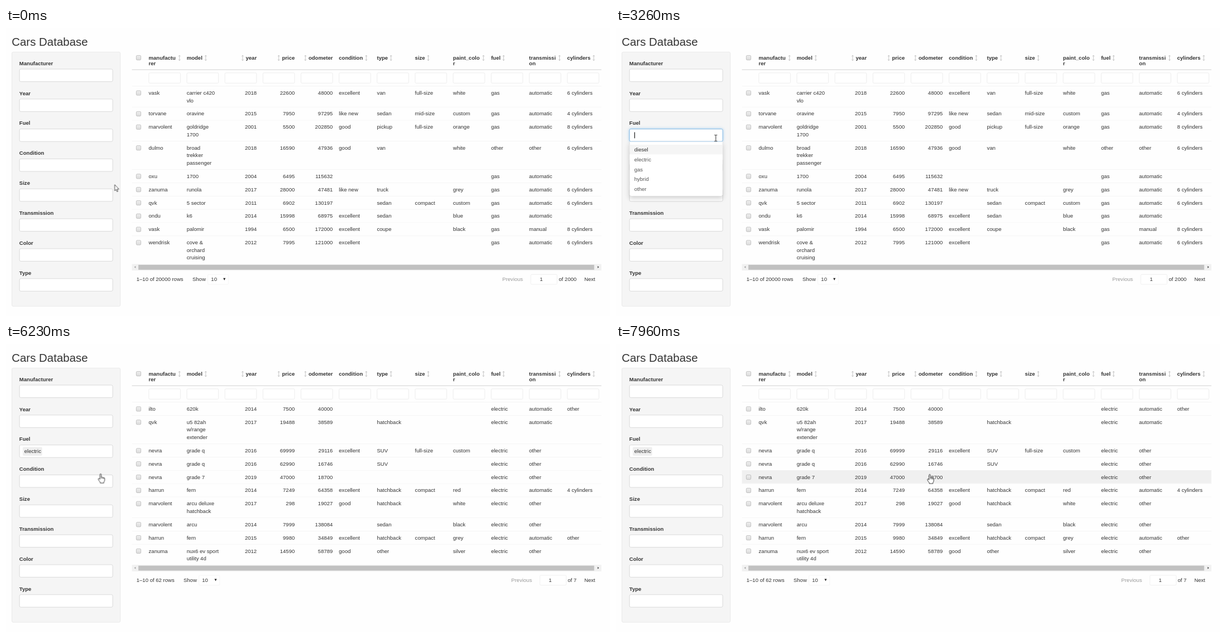
Recreate the animation shown at these times as an HTML page. Size 1082 by 518 pixels, loop 8 s.

```html
<!DOCTYPE html>
<html lang="en">
<head>
<meta charset="utf-8">
<title>Cars Database</title>
<style>
html, body { margin: 0; width: 100%; height: 100%; overflow: hidden; background: #fefefe; }
body { position: relative; }
/* The page is laid out at full size and shown smaller. */
.page { left: 0; top: 0; width: 1588px; height: 760px; transform: scale(.6815); transform-origin: 0 0; font: 14px/20px "Liberation Sans", Arial, sans-serif; color: #333; }
div, svg { position: absolute; box-sizing: border-box; white-space: pre; }
svg { overflow: visible; }
.title { left: 15px; top: 20px; font-size: 30px; line-height: 33px; }
.well { left: 15px; top: 63px; width: 286px; height: 672px; background: #f5f5f5; border: 1px solid #e3e3e3; border-radius: 4px; }
.label { left: 35px; font-weight: bold; }
.input { left: 35px; width: 246px; height: 34px; background: #fff; border: 1px solid #ccc; border-radius: 4px; }
.th { top: 70px; width: 84px; font-weight: bold; line-height: 16px; }
.num { text-align: right; }
.filter { top: 118px; width: 84px; height: 28px; background: #fff; border: 1px solid #e5e5e5; border-radius: 3px; }
.rule { left: 331px; top: 109px; width: 1234px; height: 2px; background: #dedede; }
.check { left: 342px; width: 13px; height: 13px; border: 1px solid #a9a9a9; border-radius: 3px; background: linear-gradient(#eee, #dcdcdc); }
.row { left: 331px; width: 1234px; border-top: 1px solid #f2f2f2; }
.row .check { left: 11px; top: 11px; }
.cell { top: 7px; width: 84px; }
.track { left: 331px; width: 1234px; height: 17px; background: #f1f1f1; }
.thumb { left: 17px; top: 2px; width: 1198px; height: 13px; background: #c1c1c1; }
.left, .right { top: 5px; border: 3.5px solid transparent; }
.left { left: 3px; border-right: 4px solid #a3a3a3; }
.right { left: 1224px; border-left: 4px solid #505050; }
.down { border: 3.5px solid transparent; border-top: 6.5px solid #222; }
.box { height: 27px; border: 1px solid #e9e9e9; border-radius: 3px; background: #fff; }
.muted { color: #999; }
.menu { left: 35px; top: 300px; width: 246px; height: 144px; background: #fff; border: 1px solid #d0d0d0; border-top: 0; border-radius: 0 0 4px 4px; box-shadow: 0 6px 12px rgba(0,0,0,.175); }
.option { left: 0; width: 244px; height: 26px; padding: 3px 0 0 12px; color: #555; }
.focus { top: 266px; border-color: #66afe9; box-shadow: inset 0 1px 1px rgba(0,0,0,.075), 0 0 8px rgba(102,175,233,.6); }
.caret { left: 48px; top: 275px; width: 1.5px; height: 16px; background: #333; }
.tag { left: 44px; top: 272px; width: 51px; height: 23px; padding: 1px 0 0 4px; background: #efefef; border-radius: 3px; }

.old, .new, .open, .tag, .caret, .diesel, .electric, .hover, .pointer, .arrow, .beam, .hand { animation: 8s step-end infinite; }
.old { animation-name: old; }
.new { animation-name: new; }
.open { animation-name: open; }
.tag { animation-name: tag; }
.caret { animation-name: caret; }
.diesel { animation-name: diesel; }
.electric { animation-name: electric; }
.hover { animation-name: hover; }
.arrow { animation-name: arrow; }
.beam { animation-name: beam; }
.hand { animation-name: hand; }
.pointer { left: 0; top: 0; animation-name: move; animation-timing-function: linear; }
@keyframes old { 0% { visibility: visible } 77.875%, 100% { visibility: hidden } }
@keyframes new { 0% { visibility: hidden } 77.875%, 100% { visibility: visible } }
@keyframes open { 0%, 73.75%, 100% { visibility: hidden } 27.875% { visibility: visible } }
@keyframes tag { 0% { visibility: hidden } 73.75%, 100% { visibility: visible } }
@keyframes caret {
  0%, 33.75%, 47.5%, 60.75%, 73.75%, 100% { visibility: hidden }
  27.875%, 40.75%, 53.75%, 67.5% { visibility: visible }
}
@keyframes diesel { 0% { background: #f5f5f5; color: #303030 } 67.875%, 100% { background: #fff; color: #555 } }
@keyframes electric { 0% { background: #fff; color: #555 } 67.875%, 100% { background: #f5f5f5; color: #303030 } }
@keyframes hover { 0% { background: transparent } 97.25%, 100% { background: #f0f0f0 } }
@keyframes arrow { 0%, 19.95%, 63.2% { visibility: visible } 16.8%, 22.75%, 64.5%, 100% { visibility: hidden } }
@keyframes beam { 0%, 19.95%, 63.2%, 100% { visibility: hidden } 16.8%, 22.75% { visibility: visible } }
@keyframes hand { 0% { visibility: hidden } 64.5%, 100% { visibility: visible } }
@keyframes move {
  0%, 12.875% { transform: translate(194.7px, 281.7px) }
  19.125% { transform: translate(186.6px, 244px) }
  22.875% { transform: translate(178.7px, 203px) }
  25.375%, 60.75% { transform: translate(178.7px, 198px) }
  63.75% { transform: translate(174.8px, 205.7px) }
  69.125%, 93.75% { transform: translate(169.5px, 233.6px) }
  96.625% { transform: translate(304px, 241.6px) }
  99.5%, 100% { transform: translate(562px, 234.6px) }
}
</style>
</head>
<body>
<script>
const COL = 100, FIRST = 375, TABLE_LEFT = 331;

function add(parent, cls, text = "", style = {}) {
  const el = document.createElement("div");
  el.className = cls;
  el.textContent = text;
  for (const key in style) {
    const v = style[key];
    el.style[key] = typeof v === "number" ? v + "px" : v;
  }
  return parent.appendChild(el);
}

const page = add(document.body, "page");
const isNum = i => i > 1 && i < 5;

function sidebar() {
  add(page, "title", "Cars Database");
  add(page, "well");
  const names = ["Manufacturer", "Year", "Fuel", "Condition", "Size", "Transmission", "Color", "Type"];
  names.forEach((name, i) => {
    add(page, "label", name, { top: 83 + 79 * i });
    add(page, "input", "", { top: 108 + 79 * i });
  });
  add(page, "tag", "electric");
}

function header() {
  const heads = [
    ["manufactu\nrer", 455.5], ["model", 524.5], ["year", 621.5], ["price", 717],
    ["odometer", 786.5], ["condition", 946.5], ["type", 1012], ["size", 1110],
    ["paint_colo\nr", 1255], ["fuel", 1308], ["transmissi\non", 1455], ["cylinders", 1544.5]
  ];
  add(page, "check", "", { top: 72 });
  heads.forEach(([text, iconX], i) => {
    const left = FIRST + COL * i;
    add(page, isNum(i) ? "th num" : "th", text, { left });
    add(page, "filter", "", { left });
    page.insertAdjacentHTML("beforeend",
      `<svg width="1" height="1" style="left:${iconX}px;top:79px"><path d="M0-7V7M-2.5-4 0-7 2.5-4M-2.5 4 0 7 2.5 4" fill="none" stroke="#bbb" stroke-width="1.2"/></svg>`);
  });
  add(page, "rule");
}

// Cells are split by "|", lines inside a cell by "~".
function table(cls, data, count, pages, shift, hoverRow) {
  const layer = add(page, cls, "", { left: 0, top: 0 });
  let top = 153;
  data.trim().split("\n").forEach((line, r) => {
    const cells = line.trim().split("|");
    const height = 15 + 20 * cells[1].split("~").length;
    const row = add(layer, r === hoverRow ? "row hover" : "row", "", { top, height });
    add(row, "check");
    cells.forEach((text, i) =>
      add(row, isNum(i) ? "cell num" : "cell", text.replace(/~/g, "\n"), { left: FIRST - TABLE_LEFT + COL * i }));
    top += height;
  });
  footer(layer, top, count, pages, shift);
}

function footer(layer, top, count, pages, shift) {
  const track = add(layer, "track", "", { top });
  ["thumb", "left", "right"].forEach(part => add(track, part));
  const y = top + 30;
  const text = (str, left, cls = "") => add(layer, cls, str, { left, top: y });
  text(`1–10 of ${count} rows`, 343);
  text("Show", 490 - shift);
  add(layer, "box", "", { left: 530 - shift, top: y - 3, width: 55, borderColor: "#f0f0f0" });
  text("10", 539 - shift);
  add(layer, "down", "", { left: 571 - shift, top: y + 7 });
  text("Previous", 1304.5 + shift, "muted");
  add(layer, "box", "", { left: 1379 + shift, top: y - 3, width: 70 });
  text("1", 1403 + shift);
  text(`of ${pages}`, 1453 + shift);
  text("Next", 1520);
}

function menu() {
  const open = add(page, "open", "", { left: 0, top: 0 });
  add(open, "input focus");
  const list = add(open, "menu");
  ["diesel", "electric", "gas", "hybrid", "other"].forEach((name, i) =>
    add(list, "option " + name, name, { top: 8 + 26 * i }));
  add(page, "caret");
}

function pointer() {
  document.body.insertAdjacentHTML("beforeend", `
    <svg class="pointer" width="1" height="1" stroke-linejoin="round">
      <path class="arrow" d="M0 0V11L2.5 8.7 4.1 12.7 5.8 12 4.2 8.1H7.6Z" fill="#fff" stroke="#222" stroke-width=".8"/>
      <path class="beam" d="M-2.4-5.5H-.8L0-4.8.8-5.5H2.4M0-4.8V4.8M-2.4 5.5H-.8L0 4.8.8 5.5H2.4" fill="none" stroke="#222"/>
      <g class="hand" fill="#fff" stroke="#222" stroke-width=".9">
        <path d="M-1.2 9.6V1.2Q-1.2 0 0 0T1.2 1.2V6Q2.4 4.9 3.4 6.4 4.7 5.5 5.4 7 7 6.4 7.2 8V11.6Q7 13.4 5.8 14.6V16.4H-.8V14.8Q-2.6 13-4.2 9.8-4.5 8.4-3.2 8.2-2 8.3-1.2 9.6Z"/>
        <path d="M1.2 6V8.6M3.4 6.5V8.8M5.4 7V9" fill="none" stroke-width=".7"/>
      </g>
    </svg>`);
}

sidebar();
header();
table("old", `
  vask|carrier c420~vlo|2018|22600|48000|excellent|van|full-size|white|gas|automatic|6 cylinders
  torvane|oravine|2015|7950|97295|like new|sedan|mid-size|custom|gas|automatic|4 cylinders
  marvolent|goldridge~1700|2001|5500|202850|good|pickup|full-size|orange|gas|automatic|8 cylinders
  dulmo|broad~trekker~passenger|2018|16590|47936|good|van||white|other|other|6 cylinders
  oxu|1700|2004|6495|115632|||||gas|automatic|
  zanuma|runola|2017|28000|47481|like new|truck||grey|gas|automatic|6 cylinders
  qvk|5 sector|2011|6902|130197||sedan|compact|custom|gas|automatic|6 cylinders
  ondu|k6|2014|15998|68975|excellent|sedan||blue|gas|automatic|
  vask|palomir|1994|6500|172000|excellent|coupe||black|gas|manual|8 cylinders
  wendrisk|cove &~orchard~cruising|2012|7995|121000|excellent||||gas|automatic|6 cylinders`,
  20000, 2000, 0);
table("new", `
  ilto|620k|2014|7500|40000|||||electric|automatic|other
  qvk|u5 82ah~w/range~extender|2017|19488|38589||hatchback|||electric|automatic|
  nevra|grade q|2016|69999|29116|excellent|SUV|full-size|custom|electric|other|
  nevra|grade q|2016|62990|16746||SUV|||electric|other|
  nevra|grade 7|2019|47000|18700|||||electric|other|
  harrun|fern|2014|7249|64358|excellent|hatchback|compact|red|electric|automatic|4 cylinders
  marvolent|arcu deluxe~hatchback|2017|298|19027|good|hatchback||white|electric|other|
  marvolent|arcu|2014|7999|138084||sedan||black|electric|other|
  harrun|fern|2015|9980|34849|excellent|hatchback|compact|grey|electric|automatic|other
  zanuma|nux6 ev sport~utility 4d|2012|14590|58789|good|other||silver|electric|other|`,
  62, 7, 23.5, 4);
menu();
pointer();
</script>
</body>
</html>
```
